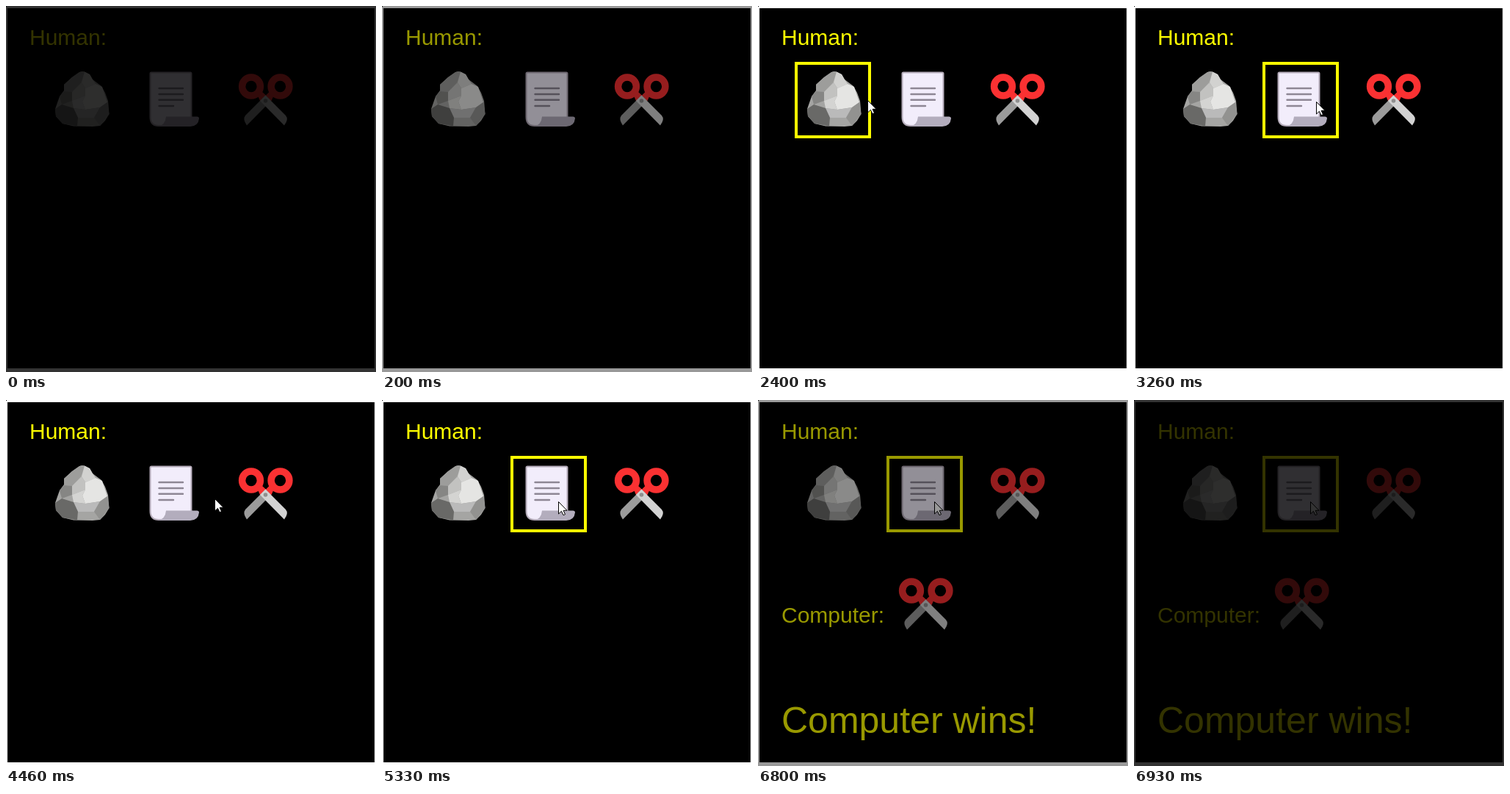
Animation, 504 px wide and 498 px high, one loop 7000 ms. Source, as an HTML page:

```html
<!DOCTYPE html>
<html lang="en">
<head>
<meta charset="utf-8">
<title>Rock, paper, scissors</title>
<style>
html, body { margin: 0; width: 100%; height: 100%; overflow: hidden; background: #000; }
svg { display: block; }
text { font: 30px "Liberation Sans", Arial, sans-serif; fill: #ff0; }
</style>
</head>
<body>
<svg width="504" height="498" viewBox="0 0 504 498">
  <defs>
    <g id="scissors">
      <g fill="none" stroke="#fa3132" stroke-width="9.5">
        <circle cx="334" cy="109.5" r="12.4"/>
        <circle cx="373.5" cy="109.5" r="12.4"/>
      </g>
      <path fill="#fa3132" d="M342 120L348 116L354 121.5L359.500 116L365.500 120L361.500 129L353.500 129L346 129Z"/>
      <path fill="#9b9b9b" d="M353.500 121.500L326 149Q322 154 328 162.500L361 129Z"/>
      <path fill="#d3d3d3" d="M353.500 121.500L381 149Q385.500 154 379 162.500L346 129Z"/>
      <circle cx="353.500" cy="129" r="2.800" fill="#8f8f8f"/>
    </g>
  </defs>
  <rect width="504" height="498" fill="#fff"/>
  <rect width="1" height="1"/>
  <rect x="2" y="3" width="500" height="490"/>
  <text x="32" y="53">Human:</text>

  <g id="rock">
    <path fill="#a5a5a3" d="M100 90Q104 88 108 90L114 93L118 100L130 109L135 118L139 129L140.500 147L135 156L128 163L118 164L92 163.500L77 160L68 150L67 140L73 123L79 115V107L90 97Z"/>
    <path fill="#9d9d9b" d="M79 107L90 97L100 90L107 89.500L102 104L90 117L79 116Z"/>
    <path fill="#d2d2d0" d="M107 89.500L114 93L118 100L122 106L108 112L103 104Z"/>
    <path fill="#c2c2c0" d="M90 117L103 104L108 112V122L90 129Z"/>
    <path fill="#e5e5e3" d="M108 112L122 106L131 110L138 131L128 138L108 141L104 130L108 122Z"/>
    <path fill="#d4d4d2" d="M90 129L108 122L104 130L108 141L92 139Z"/>
    <path fill="#bababa" d="M92 139L108 141L128 138L120 152L98 152Z"/>
    <path fill="#929290" d="M128 138L138 131L140.500 147L128 163L120 152Z"/>
    <path fill="#868684" d="M73 123L79 116L90 117V129L76 134Z"/>
    <path fill="#696967" d="M67 140L76 134L92 139L98 152L97 163.500L77 160L68 150Z"/>
  </g>

  <g id="paper">
    <path fill="#f2edfb" stroke="#b5acba" stroke-width="2" d="M196.500 92Q196.500 90.500 198 90.500H251Q252.500 90.500 252.500 92V155L240 163H208Q196.500 163 196.500 151Z"/>
    <path fill="#b3adbd" d="M218 150.500H260Q263 150.500 263 153Q262 163.500 251 164H207Q217 162 218 150.500Z"/>
    <path fill="none" stroke="#8e8795" stroke-width="2.400" stroke-linecap="round" d="M208.500 112H241M208.500 120H241M208.500 127.800H241M208.500 136H228"/>
  </g>

  <use href="#scissors"/>
  <rect id="mark" y="78" width="100" height="100" fill="none" stroke="#ff0" stroke-width="4"/>

  <g id="result">
    <text x="32" y="303">Computer:</text>
    <use href="#scissors" x="-125" y="150"/>
    <text x="32" y="453" style="font-size:50px">Computer wins!</text>
  </g>

  <path id="cursor" fill="#fff" stroke="#000" d="M.5 .5V17L4.400 13.300L7 18.700L9.500 17.600L7.100 12.300H12Z"/>
  <rect id="shade" width="504" height="498"/>
</svg>
<script>
const LOOP = 7000, FPS = 15;
const $ = id => document.getElementById(id);
const mark = $('mark'), result = $('result'), cursor = $('cursor'), shade = $('shade');

// time in ms, x, y of the pointer tip
const path = [
  [800, -14, 232], [1260, 67, 177], [1530, 84, 149], [2260, 132, 133],
  [2400, 149, 128], [3260, 248, 130], [3730, 312, 136], [4060, 341, 136],
  [4260, 341, 136], [4460, 284, 134], [4930, 240, 138]
];
const cells = [52, 177, 302];

const slope = (i, axis) => (path[i + 1][axis] - path[i][axis]) / (path[i + 1][0] - path[i][0]);

// Tangent that never overshoots
function tangent(i, axis) {
  if (i === 0) return slope(0, axis);
  if (i === path.length - 1) return 0;
  const a = slope(i - 1, axis), b = slope(i, axis);
  return a * b <= 0 ? 0 : 2 * a * b / (a + b);
}

function along(t, axis) {
  const last = path.length - 1;
  if (t <= path[0][0]) return path[0][axis];
  if (t >= path[last][0]) return path[last][axis];
  let i = 0;
  while (t >= path[i + 1][0]) i++;
  const span = path[i + 1][0] - path[i][0];
  const u = (t - path[i][0]) / span, v = 1 - u;
  return v * v * (1 + 2 * u) * path[i][axis] + u * u * (3 - 2 * u) * path[i + 1][axis]
    + span * u * v * (v * tangent(i, axis) - u * tangent(i + 1, axis));
}

function show(el, on) {
  el.setAttribute('visibility', on ? 'visible' : 'hidden');
}

function draw(ms) {
  // Whole frames, on times cut to 10 ms
  const k = Math.floor((ms + 6.7) * FPS / 1000);
  const t = Math.floor(k * 100 / FPS) * 10;
  const x = Math.round(along(t, 1)), y = Math.round(along(t, 2));
  cursor.setAttribute('transform', `translate(${x} ${y})`);
  show(cursor, t >= 860);

  const cell = cells.find(c => x >= c && x <= c + 100 && y >= 78 && y < 177);
  if (cell) mark.setAttribute('x', cell);
  show(mark, t >= 860 && cell);
  show(result, t >= 5730);

  const fadeIn = 0.8 * (1 - k / 6);
  const fadeOut = 0.2 * (k - 100);
  shade.setAttribute('opacity', Math.min(0.8, Math.max(0, fadeIn, fadeOut)));
}

function tick() {
  draw(performance.now() % LOOP);
  requestAnimationFrame(tick);
}
tick();
</script>
</body>
</html>
```
